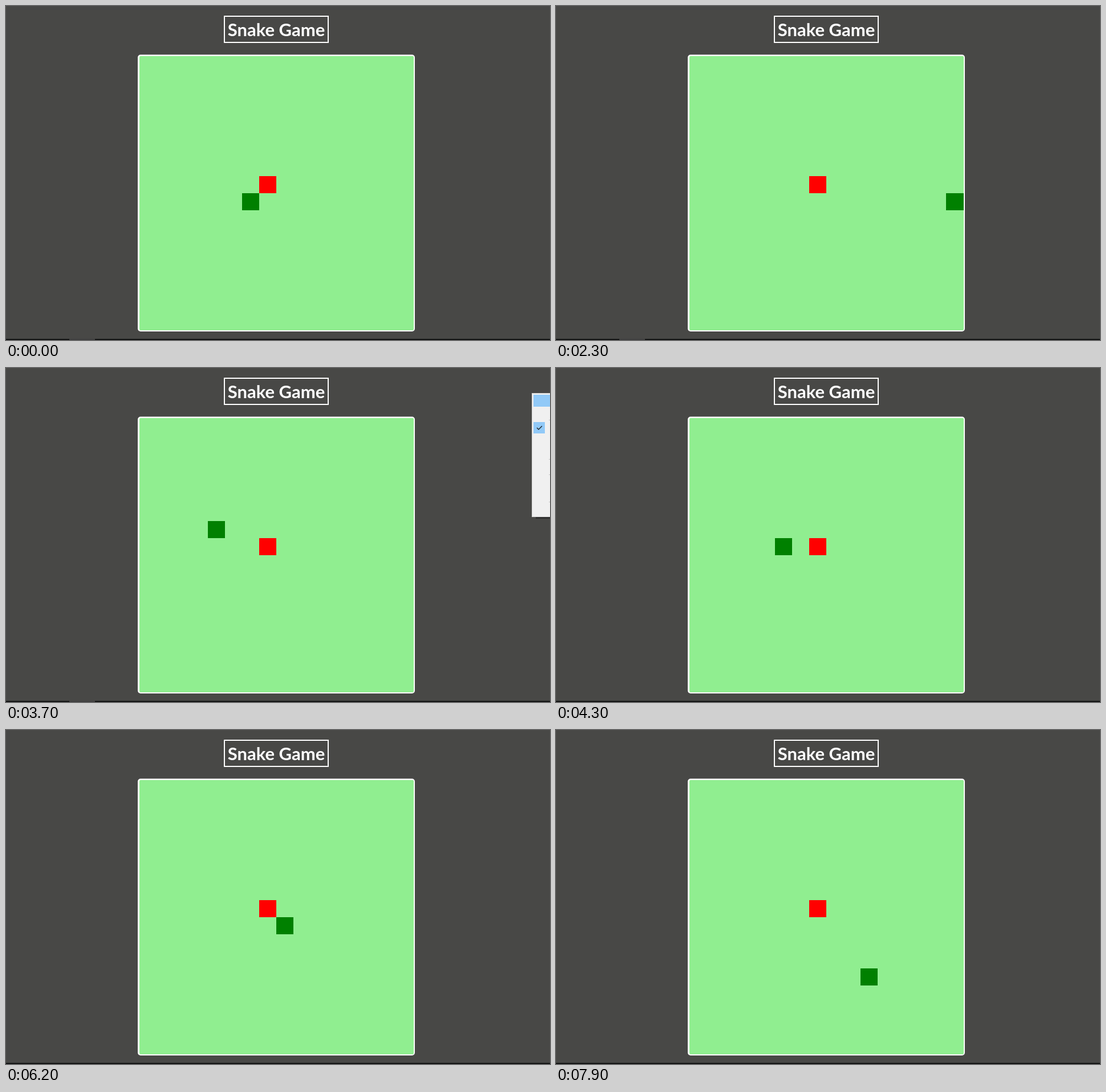
Animation of 954x587 px, one loop 8 s. Source, as an HTML page:

```html
<!DOCTYPE html>
<html lang="en">
<head>
<meta charset="utf-8">
<title>Snake Game</title>
<style>
  html, body { margin: 0; width: 100%; height: 100%; overflow: hidden; background: #484846; }
  svg { display: block; width: 954px; height: 587px; }
  .sharp { shape-rendering: crispEdges; }
  .title { font: bold 31px Lato, sans-serif; fill: #fff; text-anchor: middle; }
</style>
</head>
<body>
<svg viewBox="0 0 954 587">
  <rect width="954" height="587" fill="#484846"/>

  <rect x="383" y="18" width="182" height="46" fill="none" stroke="#fff" stroke-width="2"/>
  <text class="title" x="474" y="52.5">Snake Game</text>

  <rect x="231" y="85.5" width="486" height="486.5" rx="5" fill="#fff"/>
  <rect x="234" y="88" width="481" height="482" rx="2" fill="#90ee90"/>
  <rect id="snake" class="sharp" fill="#008000"/>
  <rect id="food" class="sharp" fill="#f00"/>

  <g class="sharp">
    <rect y="585" width="954" height="2" fill="#121313"/>
    <rect id="tab" x="111" y="585" width="45" height="2" fill="#3e3e3e"/>
  </g>

  <g id="menu">
    <rect x="929" y="262" width="25" height="2.5" fill="#2b2b2a"/>
    <rect x="922" y="44" width="32" height="218" fill="#d0d0d0"/>
    <rect x="923" y="45" width="31" height="216" fill="#f0f0f0"/>
    <rect x="925" y="47" width="29" height="21" fill="#91c9f7"/>
    <rect x="925" y="95" width="20" height="20" fill="#91c9f7"/>
    <path d="M931 105l3 3 6-6" fill="none" stroke="#222" stroke-width="1.4"/>
    <path d="M952 91.5h2M952 160.5h2M952 187.5h2M952 235.5h2" stroke="#c4c4c4"/>
  </g>
</svg>
<script>
const LOOP = 8000, TICK = 100, CELLS = 16, SIZE = 30.052;
const MENU_OPEN = 2900, MENU_CLOSE = 3800;

// Runs of moves: direction and number of cells
const ROUTE = "R34 U2 L4 D3 R1 U6 R3 D2 L4 D1 R4 D3 L2 U3 R6 D5 L2";
// Ticks on which the snake advances two cells
const DOUBLE_TICKS = [11, 20, 29, 53, 65, 75];
const DIRS = { R: [1, 0], L: [-1, 0], U: [0, -1], D: [0, 1] };

const byId = id => document.getElementById(id);
const snake = byId("snake"), menu = byId("menu"), tab = byId("tab");
const wrap = n => (n + CELLS) % CELLS;
const edgeX = col => Math.round(233.7 + SIZE * col);
const edgeY = row => Math.round(88.25 + SIZE * row);

function buildPath() {
  let col = 6, row = 8;
  const path = [[col, row]];
  for (const run of ROUTE.split(" ")) {
    const [dx, dy] = DIRS[run[0]];
    for (let n = +run.slice(1); n > 0; n--) {
      col = wrap(col + dx);
      row = wrap(row + dy);
      path.push([col, row]);
    }
  }
  return path;
}

function place(rect, [col, row]) {
  const x = edgeX(col), y = edgeY(row);
  rect.setAttribute("x", x);
  rect.setAttribute("y", y);
  rect.setAttribute("width", edgeX(col + 1) - x);
  rect.setAttribute("height", edgeY(row + 1) - y);
}

function show(el, on) {
  el.setAttribute("visibility", on ? "visible" : "hidden");
}

const path = buildPath();
const start = performance.now();

function draw() {
  const time = (performance.now() - start) % LOOP;
  const tick = Math.floor(time / TICK);
  const extra = DOUBLE_TICKS.filter(t => t <= tick).length;
  place(snake, path[tick + extra]);
  show(menu, time >= MENU_OPEN && time < MENU_CLOSE);
  show(tab, time < MENU_CLOSE);
  requestAnimationFrame(draw);
}

place(byId("food"), [7, 7]);
draw();
</script>
</body>
</html>
```
